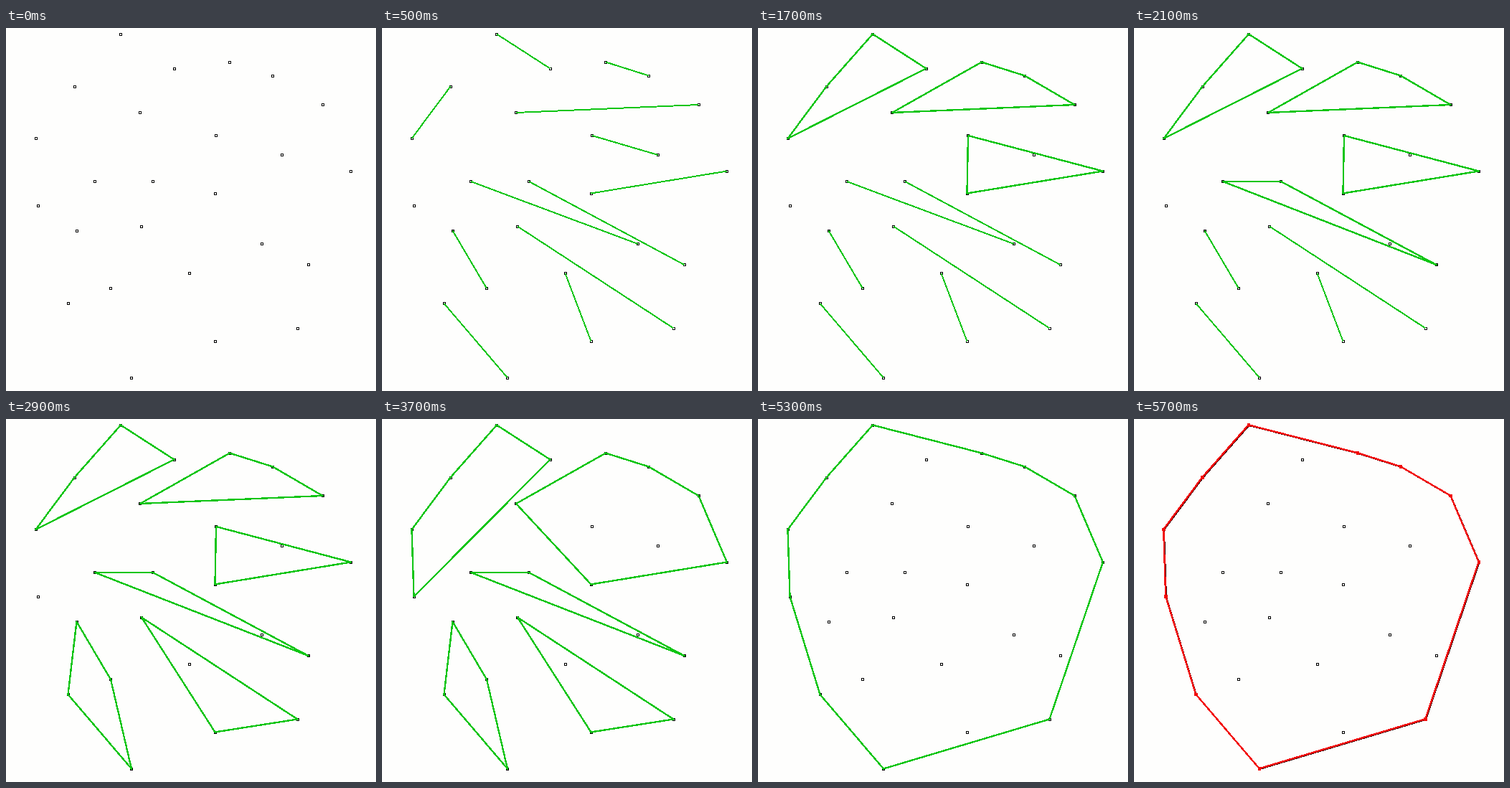
An HTML page for the animation above (6200 ms loop, 516 px wide and 506 px high).

```html
<!DOCTYPE html>
<html lang="en">
<head>
<meta charset="utf-8">
<title>Convex hull by divide and conquer</title>
<style>
  html, body { margin: 0; width: 100%; height: 100%; overflow: hidden; background: #fefefd; }
  svg { display: block; width: 100%; height: 100%; }
  path { fill: none; shape-rendering: crispEdges; }
</style>
</head>
<body>
<svg id="stage" viewBox="0 0 516 506">
  <path id="dots" stroke="#000"/>
  <path id="shade" stroke="#400" stroke-width="2" transform="translate(.5 .5)"/>
  <path id="pairs" stroke="#0fc514" stroke-width="2"/>
  <path id="hulls" stroke-width="2.4" stroke-linejoin="round"/>
  <path id="marks" stroke="#f20a0a" stroke-width="1.7"/>
</svg>
<script>
const LOOP = 6200, FIRST = 500, STEP = 400;

// The scattered points, by the cluster that takes them in.
const clusters = {
  A: [[160, 8.5], [234.5, 56.5], [95.5, 81.5], [41.5, 154]],
  B: [[312, 47.5], [372, 66.5], [187, 118], [441.5, 107]],
  C: [[293, 150], [385, 177], [291.5, 230.5], [481, 199.5]],
  D: [[124, 214], [357, 301], [205, 214], [421.5, 330]],
  E: [[189, 276.5], [406.5, 418.5], [255.5, 342], [291.5, 436.5]],
  F: [[98.5, 282.5], [146, 363], [86.5, 384], [175, 487.5]],
  P: [[44.5, 247.5]]
};
const points = Object.values(clusters).flat();

// One merge per step, named by the clusters it joins.
const merges = "A B C D E F AP BC DE APF BCDE ABCDEFP".split(" ");
const startOf = step => FIRST + STEP * (step + 1);
const RED_AT = startOf(merges.length);

const groups = merges.map((name, step) => ({
  name, at: startOf(step),
  hull: hull([...name].flatMap(c => clusters[c]))
}));
const contains = (big, small) => [...small].every(c => big.includes(c));

function cross(o, a, b) {
  return (a[0] - o[0]) * (b[1] - o[1]) - (a[1] - o[1]) * (b[0] - o[0]);
}

function chain(list) {
  const out = [];
  for (const p of list) {
    while (out.length > 1 && cross(out.at(-2), out.at(-1), p) <= 0) out.pop();
    out.push(p);
  }
  return out.slice(0, -1);
}

function hull(list) {
  const sorted = [...list].sort((a, b) => a[0] - b[0] || a[1] - b[1]);
  return [...chain(sorted), ...chain([...sorted].reverse())];
}

const line = list => "M" + list.map(p => p.join(" ")).join("L");
const squares = (list, size) => list.map(([x, y]) =>
  `M${x - size / 2} ${y - size / 2}h${size}v${size}h${-size}z`).join("");
const set = (id, name, value) => document.getElementById(id).setAttribute(name, value);

function draw(t) {
  const red = t >= RED_AT;
  const begun = groups.filter(g => g.at <= t);
  const live = begun.filter(g => !begun.some(o => o !== g && contains(o.name, g.name)));
  const path = live.map(g => line(g.hull) + "Z").join("");
  const corners = red ? live[0].hull : [];

  // Clusters not merged yet show as two separate segments.
  const loose = t < FIRST ? [] : Object.keys(clusters)
    .filter(c => clusters[c].length > 1 && !begun.some(g => g.name === c));
  set("pairs", "d", loose.map(c =>
    line(clusters[c].slice(0, 2)) + line(clusters[c].slice(2))).join(""));

  set("hulls", "d", path);
  set("hulls", "stroke", red ? "#f20a0a" : "#0fc514");
  set("hulls", "transform", red ? "translate(-.3 -.3)" : "");
  set("shade", "d", red ? path : "");
  set("dots", "d", squares(points.filter(p => !corners.includes(p)), 3));
  set("marks", "d", squares(corners, 3.2));
}

let start;
function tick(now) {
  start ??= now;
  draw((now - start) % LOOP);
  requestAnimationFrame(tick);
}
draw(0);
requestAnimationFrame(tick);
</script>
</body>
</html>
```
